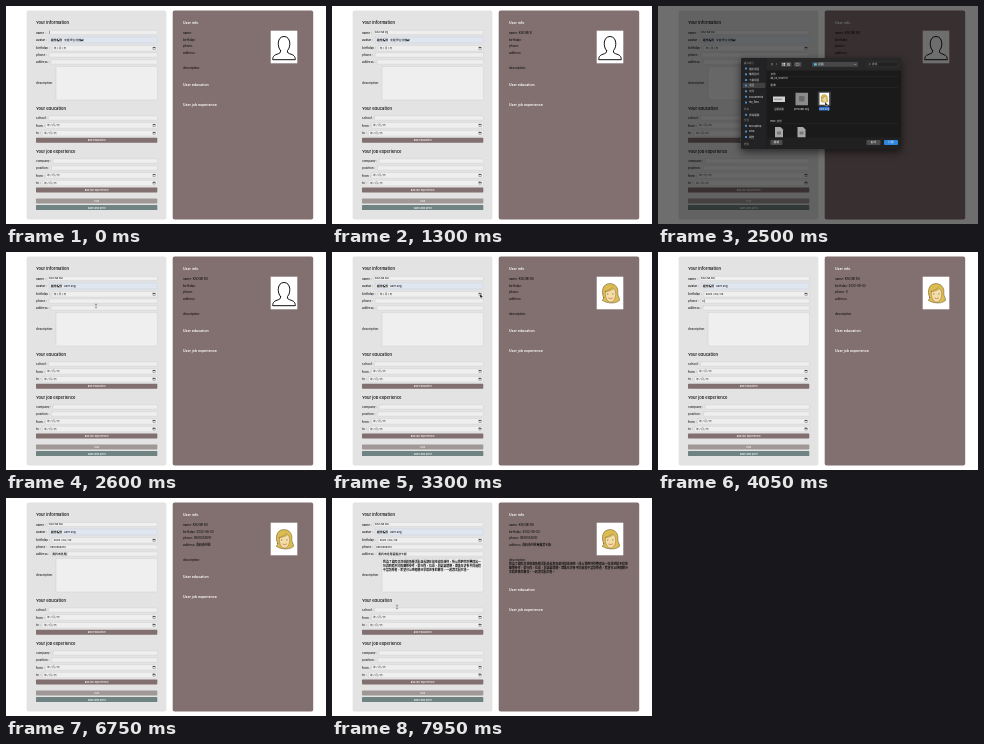
Animation, 320 px wide and 218 px high, one loop 8 s. Source, as an HTML page with a canvas:

```html
<!DOCTYPE html>
<html lang="zh-Hant">
<head>
<meta charset="utf-8">
<title>Resume form</title>
<style>
html, body { margin: 0; width: 100%; height: 100%; overflow: hidden; background: #fff; }
canvas { display: block; width: 100vw; height: 100vh; }
</style>
</head>
<body>
<canvas id="stage"></canvas>
<script>
const W = 320, H = 218, LOOP = 8000;
const stage = document.getElementById('stage');
const sheet = document.createElement('canvas');
const main = stage.getContext('2d'), side = sheet.getContext('2d');
let c = main;
const FONT = 'Inter, "Noto Sans CJK TC", "Noto Sans CJK JP", "Noto Sans CJK", sans-serif';
const MAUVE = '#826f6f', INK = '#1c1c1c';

const NAME = 'KAO MI RU', PHONE = '0900555010', ADDRESS = '青石市月見區風鈴七街';
const ABOUT = '我為了國際交流規劃各種活動並長期在基地協助接待，所以我們特別整理出一份說明給不同的團隊參考，' +
  '從行程，拉近，與創意體驗，還能在許多不同過程中當領導者，希望可以把經驗分享給更多的夥伴，一起讓活動完善。';

const NAME_KEYS = [100, 150, 200, 300, 400, 750, 900, 1200, 1400];
const PHONE_KEYS = [4050, 4200, 4300, 4400, 4500, 4600, 4700, 4800, 4900, 5050];
const ADDRESS_KEYS = [6000, 6150, 6300, 6450, 6650, 6800, 6950, 7100, 7250, 7400];
const FILE_AT = 2550, AVATAR_AT = 2650, DATE_AT = 3450, ABOUT_AT = 7700;

// time, x, y, shape
const MOUSE = [
  [[1550, 85, 50, 'beam'], [1700, 50, 33, 'arrow'], [2050, 50, 33, 'arrow'],
   [2350, 167, 96, 'arrow'], [2510, 167, 96, 'arrow'], [2600, 90, 54, 'beam'],
   [2750, 90, 54, 'beam'], [3150, 148, 42, 'arrow'], [3300, 148, 42, 'arrow'],
   [3700, 110, 70, 'arrow'], [3900, 60, 49, 'beam'], [4020, 60, 49, 'beam']],
  [[5300, 110, 80, 'beam'], [5500, 66, 58, 'beam'], [5800, 62, 57, 'beam']],
  [[7550, 64, 58, 'beam'], [7650, 65, 75, 'beam'], [7720, 65, 75, 'beam'], [7950, 65, 109, 'beam'], [8000, 65, 109, 'beam']]
];

const clamp = v => Math.max(0, Math.min(1, v));
const ease = v => v * v * (3 - 2 * v);
const typed = (s, keys, t) => s.slice(0, keys.filter(k => k <= t).length);

function box(x, y, w, h, fill, r = 0, line) {
  c.beginPath();
  c.roundRect(x, y, w, h, r);
  if (fill) { c.fillStyle = fill; c.fill(); }
  if (line) { c.strokeStyle = line; c.lineWidth = 0.35; c.stroke(); }
}

// Set large and scaled down so small sizes keep their spacing.
function text(s, x, y, size, color = INK, align = 'left', weight = 500) {
  c.save();
  c.translate(x, y);
  c.scale(size / 40, size / 40);
  c.font = `${weight} 40px ${FONT}`;
  c.textAlign = align;
  c.fillStyle = color;
  c.fillText(s, 0, 14.5);
  const w = c.measureText(s).width * size / 40;
  c.restore();
  return w;
}

function wrap(s, n, x, y, size) {
  for (let i = 0; i * n < s.length; i++) text(s.slice(i * n, i * n + n), x, y + i * 4, size, '#111', 'left', 600);
}

function shape(d, fill, line, w = 0.6) {
  const p = new Path2D(d);
  if (fill) { c.fillStyle = fill; c.fill(p); }
  if (line) { c.strokeStyle = line; c.lineWidth = w; c.lineJoin = c.lineCap = 'round'; c.stroke(p); }
}

const heading = (s, y) => text(s, 30, y, 4.1, INK, 'left', 600);

function field(label, y, x, h = 4.2) {
  text(label + ' :', 30, y, 3.05);
  box(x, y - h / 2, 151.3 - x, h, '#efefef', 0.6, '#c9c9c9');
}

function dateField(label, y, x, value) {
  field(label, y, x, 5.4);
  text(value || '年 / 月 / 日', x + 1.7, y, 2.6);
  box(146.9, y - 1, 2.4, 2.1, null, 0.2, '#333');
  box(146.9, y - 1.1, 2.4, 0.7, '#333');
}

function button(label, y, color) {
  box(30, y - 2.5, 121.3, 5, color, 0.7);
  text(label, 90.6, y, 2.6, '#fff', 'center');
}

function caret(x, y) { box(x + 0.3, y - 1.5, 0.35, 3, '#000'); }

function form(s, t) {
  box(20.6, 4.6, 139.8, 208.8, '#e3e3e3', 2);
  heading('Your information', 16.3);
  field('name', 26.5, 42);
  const nw = text(s.name, 43, 26.5, 2.6);
  if (t < 1550) caret(43 + nw, 26.5);
  text('avatar :', 30, 34, 3.05);
  box(43, 31, 108.3, 6, '#dfe6ef', 0.6, '#c3cedd');
  box(44.2, 32, 12.4, 4, '#e9eaec', 0.5);
  text('選擇檔案', 44.7, 34, 2.85, INK, 'left', 600);
  text(t < FILE_AT ? '未選擇任何檔案' : 'user.svg', 58, 34, 2.85);
  dateField('birthday', 42.3, 46, s.date && '2022 / 06 / 02');
  field('phone', 49, 43);
  const pw = text(s.phone, 44, 49, 2.6);
  if (t > 3950 && t < 5700) caret(44 + pw, 49);
  field('address', 56, 45);
  const aw = text(s.address, 46.2, 56, 2.85, INK, 'left', 600);
  if (t >= 5700 && t < 7640) caret(46.2 + aw, 56);
  text('description', 30, 76.5, 3.05);
  box(50, 60.5, 101.3, 33.5, '#efefef', 0.6, '#c9c9c9');
  wrap(s.about, 34, 51, 64.4, 2.88);

  heading('Your education', 102.1);
  field('school', 112, 42.5);
  dateField('from', 119.4, 39.5);
  dateField('to', 127.2, 36.5);
  button('add education', 134.3, MAUVE);

  heading('Your job experience', 145.2);
  field('company', 155, 47);
  field('position', 162, 45.5);
  dateField('from', 169.4, 39.5);
  dateField('to', 177, 36.5);
  button('add job experience', 184, MAUVE);
  button('CLR', 195, '#a09797');
  button('Save and print', 201.6, '#6f8383');
}

function userIcon() {
  shape('M274.5 44.5 C271 41 271 30.5 278 30.5 C285 30.5 285 41 281.5 44.5 C281 47 282.5 47.4 285 48.2 ' +
    'C288.5 49.3 289.2 51 289.3 53.7 H266.7 C266.8 51 267.5 49.3 271 48.2 C273.5 47.4 275 47 274.5 44.5Z',
    '#fff', '#111', 1);
}

function portrait() {
  shape('M271.6 45.5 C268.8 39 271 31.8 277.5 31.6 C283.5 31.4 286.6 36 285.8 41.5 C285.8 44.5 288 46 287.4 48.6 ' +
    'C284.5 51 280 51.5 276 50.6 C273.6 50.2 271.6 49 270.2 48.2 C271.4 47.4 271.8 46.6 271.6 45.5Z', '#dcbc50', '#5a4a22', 0.5);
  shape('M273.4 39.8 C276 39.4 279.8 38.2 281.6 36.6 C283.4 38.4 284 41 283.6 43.4 C283 47.8 281 50 278.4 50 ' +
    'C275.2 50 273 45.4 273.4 39.8Z', '#f4dda6', '#6b5030', 0.35);
  shape('M273.2 39.4 C276 38.6 279 37 280.6 35.2', null, '#8a7030', 0.4);
  box(275.3, 41.4, 1, 1, '#333', 0.4);
  box(280.4, 41.4, 1, 1, '#333', 0.4);
  shape('M276.8 46.2 Q278.6 47.6 280.6 46', null, '#b5543c', 0.6);
}

function card(s, t) {
  box(166.7, 4.6, 140.5, 208.8, MAUVE, 2);
  const row = (label, v, y, weight) => {
    const w = text(label + ': ', 177, y, 3, '#111');
    text(v, 177 + w, y, 2.9, '#111', 'left', weight);
  };
  const title = (s, y) => text(s, 177, y, 3.5, '#fff', 'left', 600);
  title('User info', 16.3);
  row('name', s.name, 26.5);
  row('birthday', s.date ? '2022-06-02' : '', 33.5);
  row('phone', s.phone, 40.3);
  row('address', s.address, 47.2, 600);
  row('description', '', 62.2);
  wrap(s.about, 41, 177, 66.2, 2.9);
  const dy = s.about ? 12.3 : 0;
  title('User education', 79 + dy);
  title('User job experience', 99 + dy);
  box(264.7, 24.7, 26.6, 32.6, '#fff');
  t < AVATAR_AT ? userIcon() : portrait();
}

function folder(x, y) {
  box(x - 6, y - 5.3, 5, 3, '#3f9cc9', 0.6);
  box(x - 6, y - 4.2, 12, 9.6, '#5ab8e2', 0.7);
}

function paper(x, y) {
  shape(`M${x - 4} ${y - 5.5}h5.5l2.5 2.5v8.5h-8z`, '#a8a8a8');
  box(x - 2, y - 1, 4, 3, '#777', 0.5);
}

function sidebar() {
  box(83, 52, 25.5, 91, 'rgba(36,36,38,.82)', [2, 0, 0, 2]);
  const head = (s, y) => text(s, 86, y, 2.4, '#8d8d8d');
  const item = (s, y) => {
    box(87, y - 1, 2, 2, '#4a91cf', 0.5);
    text(s, 91, y, 2.6, '#d2d2d2');
  };
  head('喜好項目', 57);
  box(84.5, 76.8, 22.8, 5.3, 'rgba(255,255,255,.14)', 0.8);
  ['最近項目', '應用程式', '下載項目', '桌面', '文件', 'Documents', 'my_files'].forEach((s, i) => item(s, 62.6 + i * 5.65));
  head('雲端', 103.5);
  item('雲端硬碟', 108.8);
  head('位置', 114.5);
  ['My laptop', 'Disk', '網路'].forEach((s, i) => item(s, 119.8 + i * 5.6));
  head('標籤', 138);
}

function fileList(scroll, picked) {
  c.save();
  c.beginPath();
  c.rect(108.5, 65, 134.5, 66.5);
  c.clip();
  c.save();
  c.translate(0, -scroll);
  const label = (s, x, y) => text(s, x, y, 2.4, '#d5d5d5', 'center');
  ['website calendar', 'demo list', 'developer notes', 'weather', 'resume form', 'practice'].forEach((s, i) => {
    const x = 121 + i * 22.7;
    folder(x, 81.5);
    s.split(' ').forEach((w, j) => label(w, x, 90 + j * 3.2));
  });
  paper(121, 115.5);
  label('ap_xx_code.txt', 121, 126.5);
  box(115, 145, 12, 5.5, '#d0d0d0');
  box(116, 147.2, 8, 1, '#888');
  box(137.5, 141.2, 12.5, 12.5, '#8c8c8c');
  box(141, 144.5, 5.5, 5.5, '#6a6a6a', 1);
  label('螢幕快照', 121, 157.2);
  label('personal.svg', 143.5, 157.2);
  if (picked) {
    box(159.8, 140, 13, 14.6, '#444446', 1);
    box(161, 155.2, 10.6, 3.8, '#2f6fd0', 0.7);
  }
  box(161.5, 141.3, 9.6, 12, '#fff');
  c.save();
  c.translate(166.3, 147.3);
  c.scale(0.42, 0.42);
  c.translate(-278.3, -42);
  portrait();
  c.restore();
  label('user.svg', 166.3, 157.2);
  paper(121, 181);
  paper(143.5, 181);
  c.restore();
  // Section titles stay at the top until the next one pushes in.
  [['檔案夾', 68], ['文件', 102.5], ['影像', 133.5], ['PDF 文件', 169.5]].forEach(([s, y], i, all) => {
    if (all[i + 1] && all[i + 1][1] - scroll <= 68) return;
    const top = Math.max(y - scroll, 68);
    box(109, top - 3.2, 134, 5.3, '#1a1a1b');
    box(112, top + 2.2, 128, 0.25, '#3a3a3a');
    text(s, 112.5, top, 2.7, '#ddd');
  });
  c.restore();
}

function dialog(t) {
  const picked = t >= 2420;
  const unit = stage.width / W;
  c.save();
  c.shadowColor = 'rgba(0,0,0,.6)';
  c.shadowBlur = 9 * unit;
  c.shadowOffsetY = 3 * unit;
  box(83, 52, 160, 91, '#1a1a1b', 2);
  c.restore();
  sidebar();
  box(108.5, 52, 134.5, 12.5, '#272728', [0, 2, 0, 0]);
  text('‹', 114, 58.3, 5, '#ccc', 'center');
  text('›', 118.5, 58.3, 5, '#777', 'center');
  box(123, 56, 10.5, 4.8, '#48484a', 0.8);
  for (let i = 0; i < 4; i++) box(124.4 + i % 2 * 1.6, 57.1 + (i >> 1) * 1.5, 1.1, 1.1, '#ddd');
  for (let i = 0; i < 3; i++) box(129, 57 + i * 1.2, 3, 0.5, '#ccc');
  box(136, 56, 7.5, 4.8, '#48484a', 0.8);
  box(138, 57.4, 3, 2, null, 0.2, '#ddd');
  box(154, 56, 46, 4.8, '#48484a', 0.8);
  box(156, 57.3, 2.8, 2.2, '#5ab8e2', 0.3);
  text('桌面', 160, 58.4, 2.8, '#eee');
  text('⌄', 197, 57.8, 3, '#ddd', 'center');
  box(209, 56, 31, 4.8, '#222223', 0.8, '#484848');
  text('搜尋', 214, 58.4, 2.7, '#aaa');
  c.beginPath();
  c.arc(211.7, 58.2, 0.8, 0, 7);
  c.strokeStyle = '#aaa';
  c.lineWidth = 0.35;
  c.stroke();
  fileList(54.5 * ease(clamp((t - 2080) / 240)), picked);
  box(108.5, 131.5, 134.5, 11.5, '#202021', [0, 0, 2, 0]);
  const btn = (s, x, w, fill) => {
    box(x - w / 2, 134.1, w, 4.8, fill, 0.9);
    text(s, x, 136.5, 2.7, '#eee', 'center');
  };
  btn('選項', 118.5, 12, '#4c4c4e');
  btn('取消', 215.5, 14, '#4c4c4e');
  btn('打開', 233, 14, picked ? '#2f86e0' : '#38383a');
}

function pointer(t) {
  const run = MOUSE.find(m => t >= m[0][0] && t < m[m.length - 1][0]);
  if (!run) return;
  const i = run.findIndex((k, n) => t < run[n + 1][0]);
  const [a, b] = [run[i], run[i + 1]];
  const p = ease((t - a[0]) / (b[0] - a[0]));
  c.save();
  c.translate(a[1] + (b[1] - a[1]) * p, a[2] + (b[2] - a[2]) * p);
  if (a[3] === 'beam') shape('M-.8 -1.9 Q0 -1.9 0 -1.3 Q0 -1.9 .8 -1.9 M0 -1.3V1.3 M-.8 1.9 Q0 1.9 0 1.3 Q0 1.9 .8 1.9', null, '#444', 0.4);
  else shape('M0 0V4L1 3.1L1.7 4.6L2.3 4.3L1.6 2.9H3Z', '#111', '#fff', 0.3);
  c.restore();
}

// Paints on a second canvas so that the whole group fades as one.
function layer(alpha, dy, paint) {
  sheet.width = stage.width;
  sheet.height = stage.height;
  side.setTransform(main.getTransform());
  side.translate(0, dy);
  c = side;
  paint();
  c = main;
  c.save();
  c.globalAlpha = alpha;
  c.drawImage(sheet, 0, 0, W, H);
  c.restore();
}

function draw(t) {
  const s = {
    name: typed(NAME, NAME_KEYS, t),
    phone: typed(PHONE, PHONE_KEYS, t),
    address: typed(ADDRESS, ADDRESS_KEYS, t),
    date: t >= DATE_AT,
    about: t >= ABOUT_AT ? ABOUT : ''
  };
  box(0, 0, W, H, '#fff');
  form(s, t);
  card(s, t);
  if (t > 1750 && t < 2600) {
    const out = clamp((2590 - t) / 80);
    box(0, 0, W, H, `rgba(0,0,0,${0.57 * clamp((t - 1750) / 360) * out})`);
    layer(clamp((t - 1750) / 160) * out, -8 * (1 - clamp((t - 1750) / 300)), () => dialog(t));
  }
  pointer(t);
}

function frame(now) {
  const dpr = window.devicePixelRatio || 1;
  const w = Math.round(innerWidth * dpr), h = Math.round(innerHeight * dpr);
  if (stage.width !== w || stage.height !== h) { stage.width = w; stage.height = h; }
  c.setTransform(w / W, 0, 0, h / H, 0, 0);
  draw(now % LOOP);
  requestAnimationFrame(frame);
}
requestAnimationFrame(frame);
</script>
</body>
</html>
```
